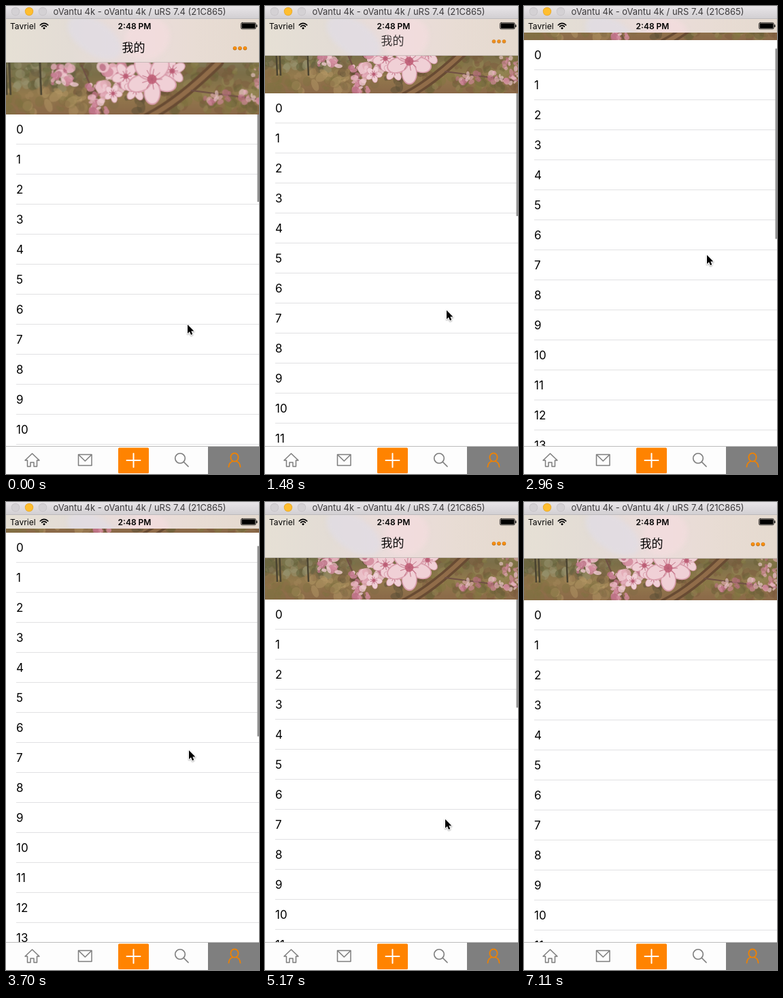
An HTML page with a canvas that plays this animation: 372x686 px, repeating every 8.01 s.

```html
<!DOCTYPE html>
<html lang="zh">
<head>
<meta charset="utf-8">
<style>
html, body { margin: 0; width: 100%; height: 100%; overflow: hidden; background: #fff; }
canvas { display: block; width: 372px; height: 686px; }
</style>
</head>
<body>
<canvas id="stage"></canvas>
<script>
const W = 372, H = 686, LOOP = 8010, STEP = 147.7;
const PHOTO_H = 150, REST = 144, TAB_Y = 645;
const SANS = 'Inter, Roboto, sans-serif';
const CJK = '"Noto Sans CJK SC", "Noto Sans CJK", sans-serif';
const ORANGE = '#ff8300';
const dpr = window.devicePixelRatio || 1;

// Key values as [step, value]
const listKeys = [[0, 159], [1, 161], [2, 156], [3, 149], [4, 146], [5, 144], [7, 144],
  [8, 143], [9, 138], [10, 128], [11, 112], [12, 104], [13, 102], [14, 101], [16, 92],
  [18, 70], [20, 50], [22, 44], [23, 43], [24, 43], [25, 45], [27, 59], [29, 73],
  [31, 88], [33, 106], [34, 128], [35, 143], [36, 146], [38, 152], [40, 150],
  [41, 147], [42, 145], [43, 144]];
const navKeys = [[9, 0], [10, -10], [11, -32], [12, -44], [33, -44], [34, -16], [35, -1], [36, 0]];
const cursorXKeys = [[0, 267], [14, 267], [20, 269], [25, 269], [29, 267], [35, 265], [43, 265]];
const cursorYKeys = [[0, 467], [1, 471], [7, 471], [9, 458], [12, 422], [14, 411], [20, 365],
  [23, 358], [24, 358], [25, 364], [29, 394], [32, 425], [35, 465], [39, 490], [43, 496]];

function at(keys, k) {
  let prev = keys[0];
  if (k <= prev[0]) return prev[1];
  for (const key of keys) {
    if (k <= key[0]) {
      return prev[1] + (key[1] - prev[1]) * (k - prev[0]) / (key[0] - prev[0] || 1);
    }
    prev = key;
  }
  return prev[1];
}

function context(canvas) {
  canvas.width = W * dpr;
  const c = canvas.getContext('2d');
  return c;
}

const stage = document.getElementById('stage');
const g = context(stage);
stage.height = H * dpr;
g.scale(dpr, dpr);

function rect(x, y, w, h, fill) {
  g.fillStyle = fill;
  g.fillRect(x, y, w, h);
}

function disc(c, x, y, r, fill, ry = r, angle = 0) {
  c.fillStyle = fill;
  c.beginPath();
  c.ellipse(x, y, r, ry, angle, 0, Math.PI * 2);
  c.fill();
}

function text(str, x, y, font, fill = '#000', align = 'left') {
  g.font = font;
  g.fillStyle = fill;
  g.textAlign = align;
  g.fillText(str, x, y);
}

function line(points, color, width, closed) {
  g.strokeStyle = color;
  g.lineWidth = width;
  g.beginPath();
  points.forEach(([x, y], i) => i ? g.lineTo(x, y) : g.moveTo(x, y));
  if (closed) g.closePath();
  g.stroke();
}

function gradient(c, x0, y0, x1, y1, colors) {
  const gr = c.createLinearGradient(x0, y0, x1, y1);
  colors.forEach((color, i) => gr.addColorStop(i / (colors.length - 1), color));
  return gr;
}

// Blossom picture, simplified to soft blobs; its bottom edge is PHOTO_H
function paintPhoto() {
  const canvas = document.createElement('canvas');
  const c = context(canvas);
  canvas.height = PHOTO_H * dpr;
  c.scale(dpr, dpr);
  let seed = 7;
  const rnd = () => (seed = seed * 16807 % 2147483647) / 2147483647;
  const spread = (n, x, y, w, h, size, colors, alpha) => {
    c.globalAlpha = alpha;
    for (let i = 0; i < n; i++) {
      const px = x + rnd() * w, py = y + rnd() * h, r = size * (0.5 + rnd());
      disc(c, px, py, r, colors[Math.floor(rnd() * colors.length)], r * (0.5 + rnd() * 0.5), rnd() * 3);
    }
    c.globalAlpha = 1;
  };
  c.fillStyle = gradient(c, 0, 70, 0, 150, ['#827c5c', '#7b6e48', '#937a4d', '#8a6848']);
  c.fillRect(0, 0, W, PHOTO_H);
  spread(130, 0, 75, 130, 40, 5, ['#5d6039', '#77774c', '#9a9672', '#6b6044'], 0.5);
  spread(70, 0, 117, 130, 30, 7, ['#b79b68', '#a3875a', '#7f7040', '#8c6c48'], 0.45);
  spread(150, 230, 80, 142, 68, 6, ['#7f763f', '#695f38', '#948553', '#7c593d'], 0.5);
  spread(60, 110, 80, 130, 68, 6, ['#6a4d35', '#846b47', '#5d5137'], 0.55);
  c.strokeStyle = '#4a4330';
  for (const x of [16, 21, 62]) {
    c.lineWidth = 2.5;
    c.beginPath();
    c.moveTo(x, 78);
    c.lineTo(x + 2, 124);
    c.stroke();
  }

  // Branches
  c.lineCap = 'round';
  for (const [w, color] of [[13, '#684b33'], [6, '#906c49']]) {
    c.lineWidth = w;
    c.strokeStyle = color;
    c.beginPath();
    c.moveTo(206, 154);
    c.quadraticCurveTo(247, 134, 302, 80);
    c.stroke();
  }
  c.lineWidth = 2;
  c.strokeStyle = '#705044';
  c.beginPath();
  c.moveTo(118, 85);
  c.lineTo(146, 148);
  c.moveTo(265, 118);
  c.lineTo(372, 132);
  c.stroke();

  const pinks = ['#d28a9c', '#e4adb9', '#bd7186', '#efc9d0'];
  spread(38, 78, 86, 32, 25, 4, pinks, 0.8);
  spread(40, 126, 110, 27, 38, 4, pinks, 0.8);
  spread(30, 144, 84, 36, 34, 6, pinks, 0.85);
  spread(18, 282, 121, 35, 16, 3.5, pinks, 0.6);
  spread(26, 328, 119, 44, 16, 3.5, pinks, 0.65);
  spread(20, 340, 86, 32, 28, 3, pinks, 0.6);

  const flower = (x, y, r, turn) => {
    for (let i = 0; i < 5; i++) {
      const a = turn + i * Math.PI * 0.4;
      const px = x + Math.cos(a) * r * 0.55, py = y + Math.sin(a) * r * 0.55;
      disc(c, px, py, r * 0.52, '#d99dac', r * 0.36, a);
      disc(c, px, py, r * 0.46, '#f0d0d6', r * 0.31, a);
    }
    disc(c, x, y, r * 0.2, '#c76a80');
    c.strokeStyle = '#b65c74';
    c.lineWidth = 0.8;
    for (let i = 0; i < 9; i++) {
      const a = i * 0.7;
      c.beginPath();
      c.moveTo(x, y);
      c.lineTo(x + Math.cos(a) * r * 0.42, y + Math.sin(a) * r * 0.42);
      c.stroke();
    }
  };
  flower(177, 99, 18, 0.4);
  flower(239, 92, 18, 0.8);
  flower(160, 122, 12, 0.1);
  flower(190, 117, 15, 1);
  flower(212, 103, 32, 0.3);
  return canvas;
}
const photo = paintPhoto();

function drawList(top, barShown) {
  rect(0, top, W, H - top, '#fff');
  for (let i = 0, y = top; y < TAB_Y; i++, y += 44) {
    text(String(i), 15, y + 28, `17px ${SANS}`);
    rect(15, y + 43, W - 15, 1, '#e1e1e3');
  }
  if (barShown) {
    const over = top - REST;
    const end = 301 - over * (over > 0 ? 0.93 : 0.43);
    const start = Math.max(top, end - 279);
    rect(369.5, start, 2.5, end - start, '#929292');
  }
}

function drawPhoto(top) {
  const s = 1 + Math.max(0, top - REST) / PHOTO_H;
  g.drawImage(photo, W / 2 * (1 - s), top - PHOTO_H * s, W * s, PHOTO_H * s);
}

function drawBars(nav) {
  const bottom = 83 + nav;
  g.save();
  g.beginPath();
  g.rect(0, 19, W, bottom - 19);
  g.clip();
  rect(0, 19, W, 64, gradient(g, 0, 0, W, 0, ['#e6e0d5', '#e3dcd5', '#ebdcdb', '#e8dcd4', '#e5dacf']));
  g.filter = 'blur(3px)';
  disc(g, 130, 46, 45, 'rgba(224,220,228,.75)', 24, 0.6);
  disc(g, 208, 48, 34, 'rgba(243,220,222,.75)', 30, -0.6);
  g.filter = 'none';
  g.globalAlpha = Math.max(0, 1 + nav / 44);
  text('我的', 187.5, 67 + nav, `500 17px ${CJK}`, '#000', 'center');
  for (const x of [336.5, 344, 351.5]) {
    disc(g, x, 62 + nav, 2.8, '#b96a10');
    disc(g, x, 61.6 + nav, 2.2, '#ff9210');
  }
  g.restore();
  if (nav > -44) rect(0, bottom - 0.5, W, 0.5, 'rgba(0,0,0,.3)');
}

function drawStatus() {
  text('Tavriel', 6, 33.5, `12px ${SANS}`);
  g.strokeStyle = '#000';
  g.lineWidth = 1.7;
  for (const r of [4.4, 7.6]) {
    g.beginPath();
    g.arc(56, 33, r, -Math.PI * 0.77, -Math.PI * 0.23);
    g.stroke();
  }
  disc(g, 56, 32.4, 1.5, '#000');
  text('2:48 PM', 189, 33.5, `600 12px ${SANS}`, '#000', 'center');
  g.lineWidth = 0.7;
  g.beginPath();
  g.roundRect(345.4, 24.4, 22, 9.4, 2);
  g.stroke();
  rect(346.5, 25.4, 20, 7.4, '#000');
  rect(368.2, 27.4, 1.3, 3.6, '#000');
}

function drawTitleBar() {
  rect(0, 0, W, 19, gradient(g, 0, 0, 0, 19, ['#e8e5e8', '#d1ced1']));
  rect(0, 18, W, 1, '#bdbabd');
  [[14, '#d4d1d4', '#c2bfc2'], [34, '#ffbe2f', '#e0a128'], [54, '#d4d1d4', '#c2bfc2']].forEach(([x, fill, edge]) => {
    disc(g, x, 8, 6.2, edge);
    disc(g, x, 8, 5.6, fill);
  });
  text('oVantu 4k - oVantu 4k / uRS 7.4 (21C865)', 196.5, 13, `13px ${SANS}`, '#3c3a3c', 'center');
}

function drawTabs() {
  const gray = '#7d7d7d';
  rect(0, TAB_Y, W, H - TAB_Y, '#fdfdfd');
  rect(0, TAB_Y, W, 1, '#bcbcbc');
  g.lineJoin = 'round';
  g.lineCap = 'round';
  line([[28, 666], [38.5, 656], [49, 666], [45.5, 666], [45.5, 675], [41, 675], [41, 669],
    [36, 669], [36, 675], [31.5, 675], [31.5, 666]], gray, 1.5, true);
  line([[106.5, 657.5], [126, 657.5], [126, 673.5], [106.5, 673.5]], gray, 1.5, true);
  line([[107, 658], [116.3, 667], [125.5, 658]], gray, 1.5);

  g.fillStyle = ORANGE;
  g.beginPath();
  g.roundRect(165, 647.5, 45, 37.5, 1.5);
  g.fill();
  line([[177.5, 666], [197.5, 666]], '#fff', 2);
  line([[187.5, 656], [187.5, 676]], '#fff', 2);

  g.strokeStyle = gray;
  g.lineWidth = 1.6;
  g.beginPath();
  g.arc(256, 663, 7.3, 0, Math.PI * 2);
  g.stroke();
  line([[261.5, 668.5], [268, 675]], gray, 1.7);

  rect(297, 646, 75, 40, '#7f7f7f');
  g.strokeStyle = '#f08200';
  g.lineWidth = 1.8;
  g.beginPath();
  g.ellipse(336, 661.5, 5.6, 6.2, 0, 0, Math.PI * 2);
  g.stroke();
  g.beginPath();
  g.moveTo(327.5, 675.5);
  g.quadraticCurveTo(328, 669, 333, 667.5);
  g.moveTo(339, 667.5);
  g.quadraticCurveTo(344, 669, 344.5, 675.5);
  g.stroke();
}

function drawCursor(x, y) {
  g.save();
  g.translate(x, y);
  g.beginPath();
  [[0, 0], [0, 13], [3, 10.3], [5, 15], [7.3, 14], [5.3, 9.5], [9.4, 9.4]]
    .forEach(p => g.lineTo(...p));
  g.closePath();
  g.shadowColor = 'rgba(0,0,0,.35)';
  g.shadowBlur = 2 * dpr;
  g.shadowOffsetY = dpr;
  g.lineWidth = 2;
  g.strokeStyle = '#fff';
  g.stroke();
  g.shadowColor = 'transparent';
  g.fillStyle = '#000';
  g.fill();
  g.restore();
}

function draw(now) {
  const k = Math.floor(now % LOOP / STEP);
  const top = Math.round(at(listKeys, k));
  const barShown = k < 6 || (k > 7 && k < 43);
  drawList(top, barShown);
  drawPhoto(top);
  drawBars(Math.round(at(navKeys, k)));
  drawStatus();
  drawTitleBar();
  drawTabs();
  if (k < 48) drawCursor(at(cursorXKeys, k), at(cursorYKeys, k));
}

const begin = performance.now();
function tick() {
  draw(performance.now() - begin);
  requestAnimationFrame(tick);
}
tick();
</script>
</body>
</html>
```
